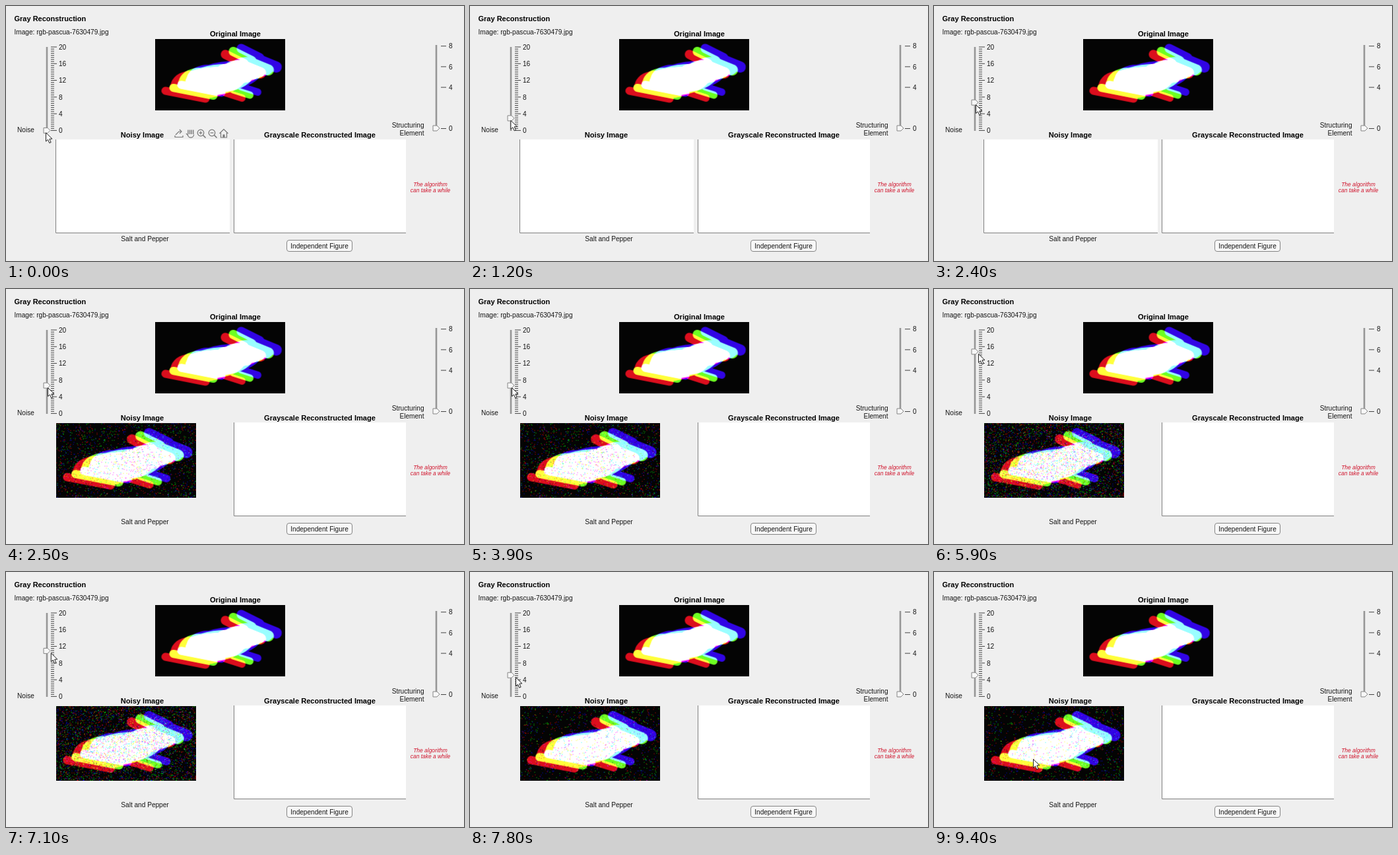
An HTML page with a canvas that plays this animation: 694x386 px, repeating every 9500 ms.

```html
<!DOCTYPE html>
<html lang="en">
<head>
<meta charset="utf-8">
<title>Gray Reconstruction</title>
<style>
html, body { margin: 0; width: 100%; height: 100%; overflow: hidden; background: #efefef; }
canvas { display: block; }
</style>
</head>
<body>
<canvas id="stage" width="694" height="386"></canvas>
<script>
const LOOP = 9500, STEP = 100, TOOLBAR_END = 500, RESULT_DELAY = 400;
const ctx = document.getElementById('stage').getContext('2d');
const FONT = '"Liberation Sans", Arial, sans-serif';
const GRAY = '#777';

// Each drag ends on a noise level; its result appears after a delay.
const DRAGS = [
  { from: 500, to: 2100, level: 6.7, drift: 3 },
  { from: 4700, to: 4900, level: 14.8, drift: 4 },
  { from: 6900, to: 7400, level: 5.1, drift: 2 }
];
const LEAVE = { from: 9100, to: 9400, x: 150, y: 283 };

const progress = (t, { from, to }) => Math.min(1, Math.max(0, (t - from) / (to - from)));
const mix = (a, b, p) => a + (b - a) * p;
const levelY = level => 188.4 - level * 6.32;

function makeCanvas(width, height) {
  return Object.assign(document.createElement('canvas'), { width, height });
}

function limb(g, x1, y1, x2, y2, width) {
  g.lineWidth = width;
  g.beginPath();
  g.moveTo(x1, y1);
  g.lineTo(x2, y2);
  g.stroke();
}

function blob(g, x, y, rx, ry, angle) {
  g.beginPath();
  g.ellipse(x, y, rx, ry, angle, 0, 2 * Math.PI);
  g.fill();
}

function rabbit(g) {
  g.lineCap = 'round';
  blob(g, 92, 62, 58, 23, -0.15);      // body
  blob(g, 63, 63, 27, 19, -0.2);       // haunch
  blob(g, 136, 47, 32, 15, 0.1);       // head
  limb(g, 119, 19, 147, 33, 14);       // ears
  limb(g, 145, 36, 172, 47, 17);
  limb(g, 28, 74, 89, 86, 12);         // feet
  limb(g, 119, 77, 144, 85, 11);
}

// Three shifted colour channels add up to white where they overlap.
function rabbitImage(width, height) {
  const image = makeCanvas(width, height), g = image.getContext('2d');
  g.fillStyle = '#040404';
  g.fillRect(0, 0, width, height);
  g.globalCompositeOperation = 'lighter';
  ['rgb(215,10,25)', 'rgb(105,250,30)', 'rgb(45,0,225)'].forEach((color, i) => {
    const layer = makeCanvas(width, height), l = layer.getContext('2d');
    l.fillStyle = l.strokeStyle = color;
    l.scale(width / 197, height / 108);
    l.translate(12 * (i - 1), 4.5 * (1 - i));
    rabbit(l);
    g.drawImage(layer, 0, 0);
  });
  return image;
}

function random(seed) {
  return () => (seed = (seed * 48271) % 2147483647) / 2147483647;
}

function noisyImage(level) {
  const image = rabbitImage(212, 113), g = image.getContext('2d');
  const pixels = g.getImageData(0, 0, image.width, image.height);
  const rnd = random(Math.round(level * 1000)), density = level * 0.007, strength = 0.8;
  for (let i = 0; i < pixels.data.length; i++) {
    const r = rnd();
    if (i % 4 < 3 && r < density) {
      pixels.data[i] = mix(pixels.data[i], r < density / 2 ? 0 : 255, strength);
    }
  }
  g.putImageData(pixels, 0, 0);
  return image;
}

const clean = rabbitImage(197, 108);
for (const drag of DRAGS) drag.result = noisyImage(drag.level);

function text(str, x, y, { size = 10.1, style = '', color = '#161616', align = 'left' } = {}) {
  ctx.font = `${style} ${size}px ${FONT}`;
  ctx.fillStyle = color;
  ctx.textAlign = align;
  ctx.fillText(str, x, y);
}

function line(points, color = GRAY, width = 1.2) {
  ctx.strokeStyle = color;
  ctx.lineWidth = width;
  ctx.beginPath();
  points.forEach(([x, y]) => ctx.lineTo(x, y));
  ctx.stroke();
}

function polygon(points, fill, stroke) {
  ctx.beginPath();
  points.forEach(([x, y]) => ctx.lineTo(x, y));
  ctx.closePath();
  ctx.fillStyle = fill;
  ctx.fill();
  ctx.strokeStyle = stroke;
  ctx.lineWidth = 1;
  ctx.stroke();
}

function slider(x, top, bottom, thumbY) {
  line([[x, top], [x, bottom]], '#969696', 2.6);
  polygon([[x - 5, thumbY - 4], [x + 1, thumbY - 4], [x + 5, thumbY],
    [x + 1, thumbY + 4], [x - 5, thumbY + 4]], '#f7f7f7', '#858585');
}

function noiseSlider(thumbY) {
  for (let level = 0; level <= 20; level += 0.5) {
    const y = levelY(level), major = level % 4 === 0;
    line([[68, y], [major ? 77 : 73, y]], '#444', 1);
    if (major) text(String(level), 80, y + 3.8);
  }
  slider(62, 62, 189, thumbY);
  text('Noise', 17, 191);
}

function elementSlider() {
  for (const size of [0, 4, 6, 8]) {
    const y = 185.5 - size * 15.6;
    line([[659, y], [667, y]], '#444', 1);
    text(String(size), 671, y + 3.6);
  }
  slider(652, 59, 186, 185);
  text('Structuring', 633.5, 184.2, { align: 'right' });
  text('Element', 633.5, 196.2, { align: 'right' });
}

function axes(x, y, w, h) {
  ctx.fillStyle = '#fff';
  ctx.fillRect(x, y, w, h);
  line([[x + .5, y], [x + .5, y + h - .5], [x + w, y + h - .5]], '#808080', 1);
}

function ring(x, y, r, end = 2 * Math.PI) {
  ctx.strokeStyle = GRAY;
  ctx.lineWidth = 1.2;
  ctx.beginPath();
  ctx.arc(x, y, r, 0, end);
  ctx.stroke();
}

function magnifier(x, zoomIn) {
  ring(x - 1, 192, 4.8);
  line([[x + 2.5, 195.5], [x + 6.5, 199.5]], GRAY, 1.6);
  line([[x - 3.5, 192], [x + 1.5, 192]]);
  if (zoomIn) line([[x - 1, 189.5], [x - 1, 194.5]]);
}

function toolbar() {
  line([[256, 196], [256, 198.5], [268, 198.5], [268, 196]]);
  line([[257, 195], [262, 190], [266, 190]]);
  line([[263, 187], [266, 190], [263, 193]]);
  for (let i = 0; i < 4; i++) line([[276 + i * 2.6, 187.5], [276 + i * 2.6, 194]], GRAY, 1.4);
  ring(280, 194.5, 4.6, Math.PI);
  line([[273, 193], [276, 196]]);
  magnifier(296, true);
  magnifier(313, false);
  line([[323.5, 193], [330, 186.5], [336.5, 193]]);
  line([[325.5, 192], [325.5, 199], [334.5, 199], [334.5, 192]]);
  line([[330, 194.5], [330, 199]], GRAY, 3);
}

function button() {
  ctx.beginPath();
  ctx.roundRect(425.5, 354.5, 99, 17, 3.5);
  ctx.fillStyle = '#f7f7f7';
  ctx.fill();
  ctx.strokeStyle = '#858585';
  ctx.lineWidth = 1;
  ctx.stroke();
  text('Independent Figure', 475, 366.8, { align: 'center' });
}

function cursor(x, y) {
  ctx.save();
  ctx.translate(x + .5, y + .5);
  polygon([[0, 0], [0, 13], [3, 10.3], [5.3, 15.5], [7.6, 14.5], [5.4, 9.4], [9.5, 9.2]],
    '#fff', '#222');
  ctx.restore();
}

function stateAt(t) {
  let level = 0, x = 60, result = null;
  for (const drag of DRAGS) {
    const p = progress(t, drag);
    level = mix(level, drag.level, p);
    x += drag.drift * p;
    if (t >= drag.to + RESULT_DELAY) result = drag.result;
  }
  const thumbY = levelY(level), p = progress(t, LEAVE);
  return { thumbY, result, x: mix(x, LEAVE.x, p), y: mix(thumbY + 3, LEAVE.y, p) };
}

function draw(t) {
  const { thumbY, result, x, y } = stateAt(t);
  const heading = { size: 11.1, style: 'bold', color: '#000', align: 'center' };
  const warning = { size: 8.45, style: 'italic', color: '#d0142c', align: 'center' };

  ctx.fillStyle = '#efefef';
  ctx.fillRect(0, 0, 694, 386);
  text('Gray Reconstruction', 12.5, 23, { ...heading, size: 11, align: 'left' });
  text('Image: rgb-pascua-7630479.jpg', 12.5, 43);
  text('Original Image', 347.5, 46, heading);
  ctx.drawImage(clean, 225.5, 49.8);

  noiseSlider(thumbY);
  elementSlider();

  if (result) ctx.drawImage(result, 75.5, 202.6);
  else axes(75, 202, 264, 142);
  axes(345, 202, 261, 142);
  text('Noisy Image', 206.5, 199, heading);
  text('Grayscale Reconstructed Image', 475.5, 199, heading);
  if (t < TOOLBAR_END) toolbar();

  text('Salt and Pepper', 210.5, 355.8, { align: 'center' });
  text('The algorithm', 643, 272.5, warning);
  text('can take a while', 643, 282.3, warning);
  button();
  cursor(x, y);
}

const start = performance.now();
function tick() {
  const t = (performance.now() - start) % LOOP;
  draw(Math.floor(t / STEP) * STEP);
  requestAnimationFrame(tick);
}
tick();
</script>
</body>
</html>
```
